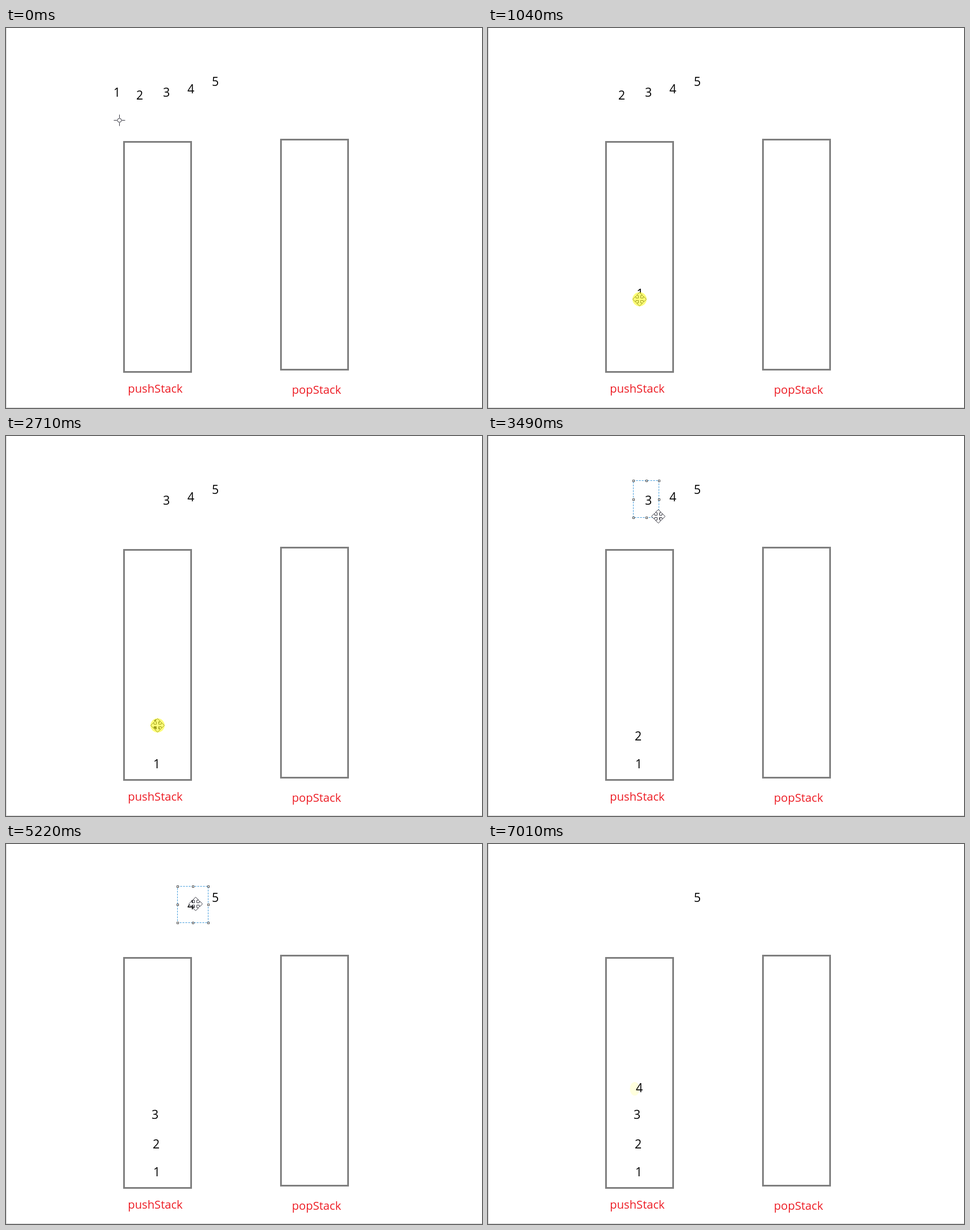
Write an HTML page with a canvas that moves like this. It is 837 px wide and 669 px high and loops after 7660 ms.

```html
<!DOCTYPE html>
<html lang="en">
<head>
<meta charset="utf-8">
<title>Two stacks</title>
<style>
  html, body { margin: 0; width: 100%; height: 100%; overflow: hidden; background: #fff; }
  canvas { display: block; }
</style>
</head>
<body>
<canvas id="stage" width="837" height="669"></canvas>
<script>
const ctx = document.getElementById('stage').getContext('2d');
const LOOP = 7660, DRAG = 520, DESELECT = 6590, LEAVE = 6670;

// from/to: corners of the selection; grip: pointer offset from the digit while dragging
const moves = [
  { home: [195, 113], slot: [265, 577], from: [162, 86], to: [215, 143], grip: [0, 10], grab: 842 },
  { home: [235, 118], slot: [264, 528], from: [214, 87], to: [259, 146], grip: [2, 2], grab: 2382 },
  { home: [282, 113], slot: [262, 476], from: [256, 79], to: [301, 144], grip: [2, 2], grab: 3832 },
  { home: [325, 107], slot: [266, 429], from: [302, 75], to: [356, 139], grip: [-4, 1], grab: 5300, hold: 210 }
];

const within = (t, a, b) => t >= a && t < b;
const add = (p, q) => p.map((v, i) => v + q[i]);

const linear = u => u;
const smooth = u => u * u * (3 - 2 * u);
const easeOut = u => 1 - (1 - u) ** 3;
const overshoot = u => 1 - (1 - u) ** 3 * (1 - 3 * u);

// Pointer journey: each tween leads on from where the previous one ended.
const tweens = [];
const go = (start, end, to, easeX = smooth, easeY = easeX) =>
  tweens.push({ start, end, to, ease: [easeX, easeY] });

let free = 30;
for (const m of moves) {
  m.press = m.grab - 640;
  m.release = m.grab - 380;
  m.drop = m.grab + DRAG + (m.hold || 0);
  go(free, m.press, m.from);
  go(m.press, m.release, m.to, linear);
  go(m.release, m.grab - 120, add(m.home, [9, -1]));
  go(m.grab - 50, m.grab, add(m.home, m.grip));
  go(m.grab, m.grab + DRAG, add(m.slot, m.grip), overshoot, easeOut);
  free = m.drop + 50;
}
go(6240, DESELECT - 30, [795, 279]);
moves.forEach((m, i) => m.clear = i + 1 < moves.length ? moves[i + 1].press : DESELECT);

function pointer(t) {
  let p = [200, 163];
  for (const { start, end, to, ease } of tweens) {
    if (t < start) break;
    const u = Math.min(1, (t - start) / (end - start));
    p = p.map((v, i) => v + (to[i] - v) * ease[i](u));
  }
  return p;
}

function digitAt(m, t) {
  if (t < m.grab) return m.home;
  return t < m.drop ? add(pointer(t), m.grip.map(v => -v)) : m.slot;
}

function text(string, x, y, size, color) {
  ctx.font = `${size}px "Open Sans", "Noto Sans", sans-serif`;
  ctx.textAlign = 'center';
  ctx.fillStyle = color;
  ctx.fillText(string, x, y);
}

const drawDigit = (digit, [x, y]) => text(digit, x, y + 7.6, 21.3, '#000');

function drawStack(name, x, y, labelX, labelY) {
  ctx.strokeStyle = '#7f7f7f';
  ctx.lineWidth = 3;
  ctx.strokeRect(x, y, 118, 405);
  text(name, labelX, labelY, 20.2, '#ed1c24');
}

function drawScene() {
  ctx.fillStyle = '#fff';
  ctx.fillRect(0, 0, 837, 669);
  ctx.fillStyle = '#d0d0d0';
  ctx.fillRect(0, 0, 1, 669);
  ctx.fillRect(0, 668, 837, 1);
  drawStack('pushStack', 207.5, 200.5, 262.5, 642);
  drawStack('popStack', 483.5, 196.5, 546, 643.5);
  drawDigit(5, [368, 94]);
}

function drawSelection(x, y, w, h, handles) {
  ctx.lineWidth = 1;
  ctx.strokeStyle = '#3f9bdc';
  ctx.setLineDash([3, 2]);
  ctx.strokeRect(x, y, w, h);
  ctx.setLineDash([]);
  if (!handles) return;
  ctx.fillStyle = '#fff';
  ctx.strokeStyle = '#555';
  for (let i = 0; i < 9; i++) {
    if (i === 4) continue;
    const box = [Math.floor(x + w * (i % 3) / 2) - .5, Math.floor(y + h * Math.floor(i / 3) / 2) - .5, 3, 3];
    ctx.fillRect(...box);
    ctx.strokeRect(...box);
  }
}

function drawCrosshair() {
  ctx.beginPath();
  ctx.arc(0, 0, 3.5, 0, 7);
  for (let i = 0; i < 4; i++) {
    ctx.moveTo(4, 0);
    ctx.lineTo(10, 0);
    ctx.rotate(Math.PI / 2);
  }
  ctx.stroke();
}

function drawMoveArrows() {
  ctx.beginPath();
  for (let i = 0; i < 4; i++) {
    for (const [x, y] of [[0, -12], [5.5, -6.5], [2, -6.5], [2, -2], [6.5, -2], [6.5, -5.5]])
      ctx.lineTo(x, y);
    ctx.rotate(Math.PI / 2);
  }
  ctx.closePath();
  ctx.fill();
  ctx.stroke();
}

function drawPointer([x, y], arrows, pressed) {
  ctx.save();
  ctx.translate(Math.round(x) - .5, Math.round(y) - .5);
  ctx.lineWidth = 1;
  ctx.strokeStyle = '#3a3a44';
  ctx.fillStyle = '#fff';
  if (arrows) drawMoveArrows();
  else drawCrosshair();
  if (pressed) {
    ctx.fillStyle = 'rgba(255, 255, 0, .52)';
    ctx.beginPath();
    ctx.arc(0, 0, 12.5, 0, 7);
    ctx.fill();
  }
  ctx.restore();
}

// Faint glow left where the last digit was dropped
function drawGlow() {
  ctx.fillStyle = '#ffffde';
  ctx.beginPath();
  ctx.ellipse(258, 431, 8.5, 12, 0, 0, 7);
  ctx.fill();
}

function draw(t) {
  drawScene();
  if (t >= moves[3].drop) drawGlow();
  const p = pointer(t);
  let arrows = false, pressed = within(t, DESELECT, DESELECT + 50);

  moves.forEach((m, i) => {
    const at = digitAt(m, t);
    drawDigit(i + 1, at);
    const selecting = within(t, m.press, m.release);
    const dragging = within(t, m.grab, m.drop);
    pressed ||= selecting || dragging;
    arrows ||= dragging;
    if (dragging || !within(t, m.press, m.clear)) return;
    const [x, y] = m.from.map((v, k) => Math.round(v + at[k] - m.home[k]) - .5);
    const [w, h] = (selecting ? p : m.to).map((v, k) => Math.round(v - m.from[k]));
    drawSelection(x, y, w, h, !selecting);
    if (!selecting && within(p[0], x, x + w) && within(p[1], y, y + h)) arrows = true;
  });

  if (t < LEAVE) drawPointer(p, arrows, pressed);
  else if (within(t, 6980, 7010)) drawPointer([837, 660], false, false);
}

function tick() {
  draw(performance.now() % LOOP);
  requestAnimationFrame(tick);
}
tick();
</script>
</body>
</html>
```
